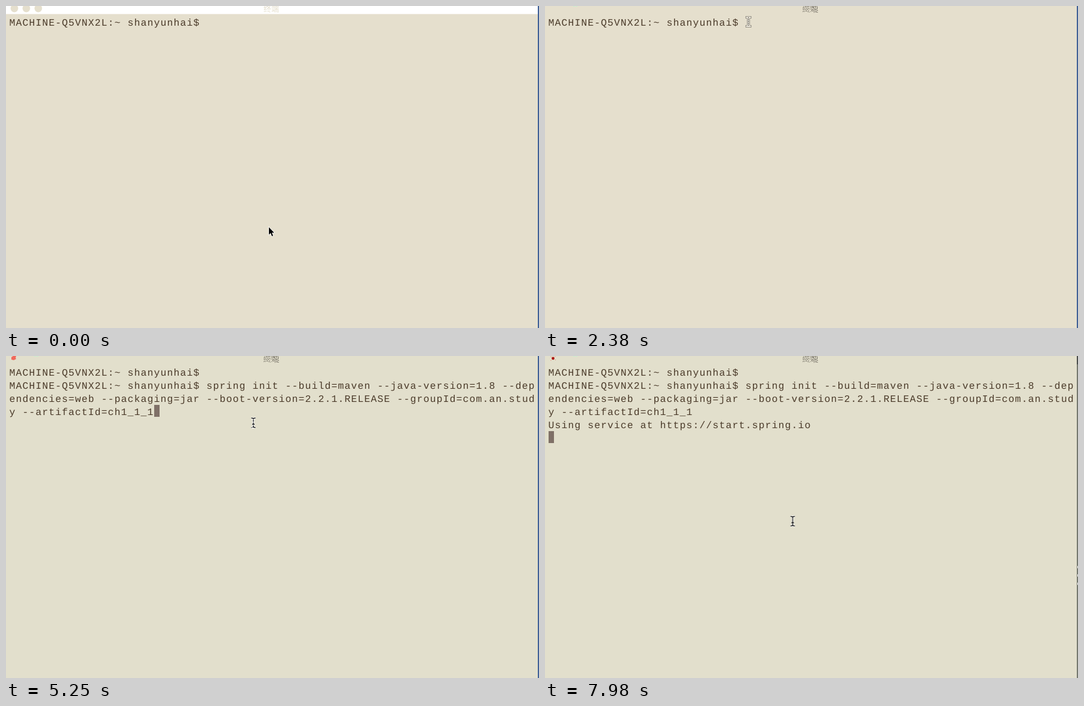
An HTML page that plays this animation: 892 by 540 pixels, repeating every 8000 ms.

```html
<!DOCTYPE html>
<html lang="zh">
<head>
<meta charset="utf-8">
<title>终端</title>
<style>
  html, body { margin: 0; width: 100%; height: 100%; overflow: hidden; background: #e5dfcd; }
  svg { display: block; width: 892px; height: 540px; }

  /* 9.9px glyphs on an 11px character grid */
  .term text { font: 16.5px "Liberation Mono", monospace; letter-spacing: 1.1px; fill: #4b3b2a; white-space: pre; text-rendering: geometricPrecision; }
  .title { font: 500 13px "Noto Sans CJK SC", "Noto Sans CJK", sans-serif; text-anchor: middle; }
  .block { fill: #7f7067; }
  .halo { fill: none; stroke: #fff; stroke-width: 3.2; }
  .stem { fill: none; stroke: #111; stroke-width: 1.3; }
  .broken .stem { stroke-dasharray: 4 1; }

  /* Switches: hard cuts on one 8 s clock */
  .cut { animation: 8s step-end infinite; }
  .bg { animation-name: bg; }
  .idle { animation-name: idle; }
  .focus { animation-name: focus; }
  .ghost { animation-name: ghost; }
  .prompt { animation-name: prompt; }
  .wait { animation-name: wait; }
  .command { animation-name: command; }
  .typed { animation-name: typed; }
  .entered { animation-name: entered; }
  .service { animation-name: service; }
  .red { animation-name: red; }
  .before { animation-name: before; }

  @keyframes bg { 0% { fill: #e5dfcd } 33.25%, 100% { fill: #e2dfcc } }
  @keyframes idle { 0% { opacity: 1 } 28%, 100% { opacity: 0 } }
  @keyframes focus { 0% { opacity: 0 } 28%, 100% { opacity: 1 } }
  @keyframes ghost { 0% { opacity: 0 } 28.875% { opacity: 1 } 33.25%, 100% { opacity: 0 } }
  @keyframes prompt { 0% { opacity: 0 } 33.25%, 100% { opacity: 1 } }
  @keyframes wait { 0% { opacity: 0 } 33.25% { opacity: 1 } 35.875%, 100% { opacity: 0 } }
  @keyframes command { 0% { opacity: 0 } 35.875%, 100% { opacity: 1 } }
  @keyframes typed { 0% { opacity: 0 } 35.875% { opacity: 1 } 68.25%, 100% { opacity: 0 } }
  @keyframes entered { 0% { opacity: 0 } 68.25% { opacity: 1 } 78.75%, 100% { opacity: 0 } }
  @keyframes service { 0% { opacity: 0 } 78.75%, 100% { opacity: 1 } }
  @keyframes red { 0% { opacity: 0 } 40.25% { opacity: 1 } 78.75%, 100% { opacity: 0 } }
  @keyframes before { 0% { opacity: 1 } 78.75%, 100% { opacity: 0 } }

  /* Mouse: arrow up to the title bar, then an I-beam over the text */
  .arrow { animation: arrow 8s ease-in-out infinite; }
  @keyframes arrow {
    0%, .8% { transform: translate(440px, 371px) }
    5.25%, 17% { transform: translate(440px, 204px) }
    22.7%, 25% { transform: translate(340px, 5px) }
    27.5%, 100% { transform: translate(340px, 21px) }
  }
  .arrow path { animation: arrow-on 8s step-end infinite; }
  @keyframes arrow-on { 0% { opacity: 1 } 28.875%, 100% { opacity: 0 } }

  .beam { animation: beam 8s ease-in-out infinite; }
  @keyframes beam {
    0%, 33.25% { transform: translate(340px, 26px) }
    38.5%, 39.5% { transform: translate(412px, 105px) }
    40.25%, 90% { transform: translate(414px, 112px) }
    98%, 100% { transform: translate(414.5px, 277px) }
  }
  .broken { animation-name: broken; }
  .solid { animation-name: solid; }
  @keyframes broken { 0% { opacity: 0 } 33.25% { opacity: 1 } 68.25%, 100% { opacity: 0 } }
  @keyframes solid { 0% { opacity: 0 } 90.125%, 100% { opacity: 1 } }
</style>
</head>
<body>
<svg viewBox="0 0 892 540">
  <defs>
    <path id="ibeam" d="M-3.5-8Q-.5-8 0-6.5V6.5Q-.5 8-3.5 8M3.5-8Q.5-8 0-6.5M0 6.5Q.5 8 3.5 8M-2 2.5H2"/>
  </defs>
  <rect class="cut bg" width="892" height="540"/>

  <!-- window edge -->
  <path class="cut before" d="M890 0h2v540h-2z" fill="#3f5f96"/>
  <g class="cut service">
    <path d="M890 0h2v540h-2z" fill="#74776e"/>
    <path d="M891.5 352v34" stroke="#fff" stroke-dasharray="4 10"/>
    <path d="M890 0h2v14h-2z" fill="#4a4d4c"/>
  </g>

  <!-- title bar without and with focus -->
  <g class="cut idle">
    <path d="M0 0h890v13.5H0z" fill="#fff"/>
    <g fill="#e5dfcd">
      <circle cx="14" cy="4" r="6.4"/>
      <circle cx="34" cy="4" r="6.4"/>
      <circle cx="54" cy="4" r="6.4"/>
      <text class="title" x="444" y="9">终端</text>
    </g>
  </g>
  <g class="cut focus">
    <text class="title" x="444" y="9" fill="none" stroke="#4f4a42" stroke-width=".8" stroke-dasharray="1 2">终端</text>
    <path d="M47 .5h7" stroke="#c4f0cf" stroke-dasharray="3 1"/>
  </g>
  <path class="cut red" d="M9 2l3-2h5l-1 3 1 2-4 2-4-1z" fill="#f0685c"/>
  <g class="cut service">
    <circle cx="13.5" cy="4" r="2.4" fill="#ad1713"/>
    <path d="M9.5 1.5h1M16.5.5h1M9.5 7.5h1M17 6.5h1" stroke="#e8786c"/>
  </g>

  <g class="term">
    <text x="5.5" y="33">MACHINE-Q5VNX2L:~ shanyunhai$</text>
    <text class="cut prompt" x="5.5" y="55">MACHINE-Q5VNX2L:~ shanyunhai$</text>
    <g class="cut command">
      <text x="335.5" y="55">spring init --build=maven --java-version=1.8 --dep</text>
      <text x="5.5" y="77">endencies=web --packaging=jar --boot-version=2.2.1.RELEASE --groupId=com.an.stud</text>
      <text x="5.5" y="99">y --artifactId=ch1_1_1</text>
    </g>
    <text class="cut service" x="5.5" y="121">Using service at https://start.spring.io</text>
    <g class="block">
      <path class="cut wait" d="M336 39h9v20h-9z"/>
      <path class="cut typed" d="M248 82h9v20h-9z"/>
      <path class="cut entered" d="M6 104h9v20h-9z"/>
      <path class="cut service" d="M6 126h9v20h-9z"/>
    </g>
  </g>

  <!-- mouse -->
  <g class="arrow">
    <path d="M0 0V12.5L2.9 9.8 5 15 7 14.2 4.9 9.2H8.8Z" stroke="#fff" stroke-width="1.4" paint-order="stroke"/>
  </g>
  <g class="cut ghost">
    <path transform="translate(340.5 26.5)" d="M-4.5-9h9v3H2V6h2.5v3h-9V6H-2V-6h-2.5z" fill="#eeeade" stroke="#3f3b34" stroke-dasharray="1 1"/>
    <path d="M340.5 19v15" stroke="#3f3b34" stroke-dasharray="2 1"/>
  </g>
  <g class="beam">
    <g class="cut broken"><use href="#ibeam" class="halo"/><use href="#ibeam" class="stem"/></g>
    <g class="cut solid"><use href="#ibeam" class="halo"/><use href="#ibeam" class="stem"/></g>
  </g>
</svg>
</body>
</html>
```
